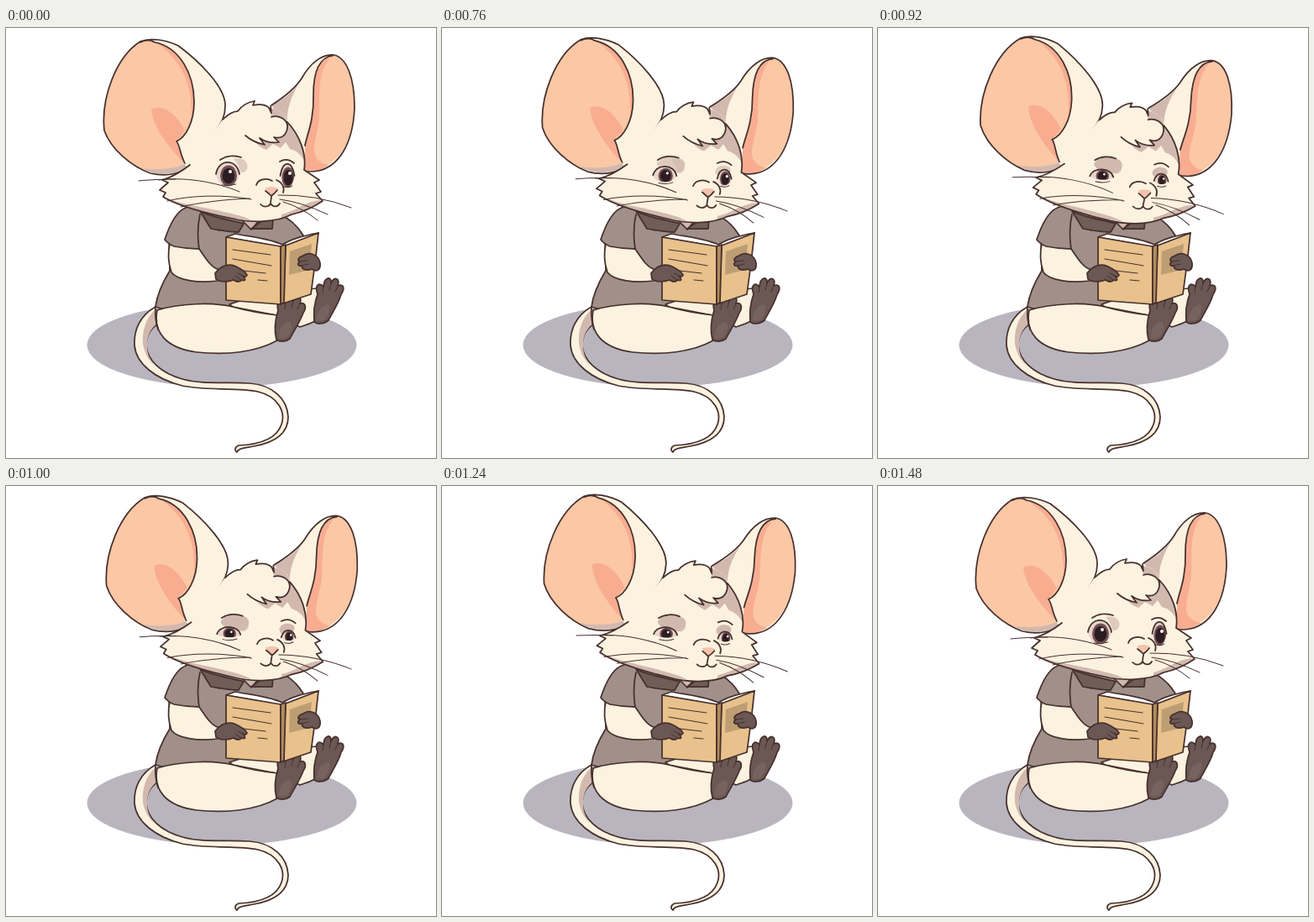
Animation of 512x512 px, one loop 2 s. Source, as an HTML page:

```html
<!DOCTYPE html>
<html lang="en">
<head>
<meta charset="utf-8">
<title>Reading mouse</title>
<style>
html, body { margin: 0; width: 100%; height: 100%; overflow: hidden; background: #fff; }
svg { display: block; width: 100vw; height: 100vh; }
path { fill: none; stroke-linejoin: round; stroke-linecap: round; }
.ink { stroke: #46302d; stroke-width: 1.75; }
.thin { stroke: #46302d; stroke-width: 1; }
.fur { fill: #fbf2e0; }
.shade { fill: #d2b9af; }
.ear { fill: #fbc7a4; }
.blush { fill: #f8ad91; }
.nose { fill: #f4c3ad; }
.shirt { fill: #a09089; }
.collar { fill: #705d58; }
.paw { fill: #6b5855; }
.pad { fill: #76635f; }
.book { fill: #e8c18c; }
.spine { fill: #b18c5c; }
.print { fill: #bd9e73; }
.page { fill: #fff; }
</style>
</head>
<body>
<svg viewBox="0 0 512 512" xmlns="http://www.w3.org/2000/svg">
  <ellipse cx="257" cy="377.500" rx="160.500" ry="50" fill="#b9b5be"/>

  <!-- tail -->
  <path class="fur ink" d="M178 332C160 342 152 359 153 378C155 400 178 418 210 426C240 432 275 428 300 433C325 439 333 458 328 472C322 490 300 496 277 497C272 499 272 503 275 505C277 500 285 500 295 498C318 494 336 484 336 463C335 442 318 425 290 423C262 421 235 425 210 418C185 411 168 396 167 378C167 366 172 358 181 352"/>
  <path class="shade" d="M178 335C166 346 162 360 163 376C165 388 170 396 177 402C170 394 168 386 168 378C168 366 172 358 180 352Z"/>

  <!-- torso and legs -->
  <path class="shirt ink" d="M214 214C230 205 310 205 326 222C340 228 348 237 354 247L340 300L300 335L222 338C205 340 190 336 178 332C180 316 187 302 195 289L194 250Z"/>
  <path class="fur ink" d="M266 329C285 322 330 312 372 310L372 347Q361 353 350 356L322 342L270 332Z"/>
  <path class="fur ink" d="M180 336C205 328 246 326 270 332C288 337 305 340 323 342L323 372C298 386 262 390 227 386C190 381 175 362 180 336Z"/>
  <path class="ink" d="M178 332Q177 347 181 359"/>
  <path class="paw ink" d="M367 350C366 338 368 325 371 317C367 306 373 302 378 308C379 296 388 295 387 304C391 295 398 298 395 307C402 304 404 310 399 317C396 328 388 340 384 348C378 353 370 353 367 350Z"/>
  <path class="pad" d="M370 348C370 338 376 330 383 329C388 331 385 340 380 347Q375 350 370 348Z"/>
  <path class="thin" d="M378 308L377 315M387 304L385 312M395 307L392 314"/>
  <path class="paw ink" d="M322 371C319 360 321 346 324 336C321 326 329 322 333 328C333 318 343 317 342 325C346 317 353 320 350 328C357 326 358 333 354 339C350 350 342 362 338 370C333 374 326 374 322 371Z"/>
  <path class="pad" d="M325 369C324 360 329 351 337 350C343 352 340 361 335 368Q330 371 325 369Z"/>
  <path class="thin" d="M333 328L332 335M342 325L340 333M350 328L347 335"/>

  <!-- collar, sleeve, arm -->
  <path class="shade ink" d="M278 226L304 226L292 240Z"/>
  <path class="collar ink" d="M231 218C246 226 270 229 283 233L277 243C263 243 252 240 244 239Z"/>
  <path class="collar ink" d="M292 239L306 229L318 227L317 239Z"/>
  <path class="fur ink" d="M195 257C192 270 194 282 197 291C205 301 230 304 252 301L252 287C243 284 237 273 230 263L205 255Z"/>
  <path class="shirt ink" d="M214 214C203 218 195 234 189 252Q194 258 200 260Q215 263 230 263C228 250 228 235 231 222"/>

  <!-- book -->
  <path class="page ink" d="M262 249L273 245C294 249 315 251 329 258C342 250 356 247 372 244L333 263L327 261Z"/>
  <path class="book ink" d="M262 249L327 260L327 329L262 324Z"/>
  <path class="book ink" d="M333 259L372 244L368 280L363 317L330 328Z"/>
  <path class="spine ink" d="M327 260L333 258L331 327L327 329Z"/>
  <path class="print" d="M338 266L364 257L361 288L337 294Z"/>
  <path class="thin" d="M270 264L315 270M270 275L316 283M274 288L309 292M300 300L311 301"/>
  <path class="paw ink" d="M249 292C255 283 266 280 274 284C280 287 286 291 287 294C286 297 283 296 282 295C286 299 285 302 281 300C278 303 274 302 271 300C263 303 253 302 250 299Z"/>
  <path class="thin" d="M282 295L276 292M280 300L273 295"/>
  <path class="paw ink" d="M374 280C372 269 360 266 354 271C348 273 346 277 350 278C346 281 348 284 352 283C353 289 360 289 364 287C370 291 375 288 374 280Z"/>
  <path class="thin" d="M350 278L359 277M352 283L360 281"/>

  <g id="head">
    <!-- right ear -->
    <path class="fur" d="M316 92C330 83 345 71 352 60C362 42 376 31 390 32C406 35 415 60 415 95C413 140 395 165 372 170L350 172Z"/>
    <path class="shade" d="M316 92Q337 82 348 67C340 82 334 95 335 113Z"/>
    <path class="ear" d="M389 33C372 35 366 55 366 80C367 110 358 128 356 140L356 170C385 170 411 150 414 98C415 60 406 35 389 33Z"/>
    <path class="blush" d="M385 36C369 40 366 58 366 80C367 110 358 128 356 140L356 170L372 170L385 163C377 162 366 157 367 143C368 130 372 120 373 106C374 84 370 55 385 36Z"/>
    <path class="ink" d="M316 92C330 83 345 71 352 60C362 42 376 31 390 32C406 35 415 60 415 95C413 140 395 165 372 170Q362 172 355 170M389 33C372 35 366 55 366 80C367 110 358 128 356 140"/>

    <!-- left ear -->
    <path class="fur" d="M219 163C212 172 194 178 172 173C150 165 125 145 117 122C113 85 130 35 160 16C172 11 190 14 205 21C228 38 262 70 261 93C261 105 257 112 250 122L240 165Z"/>
    <path class="ear" d="M212 162C196 169 178 170 166 169C146 161 126 144 117 122C113 85 130 35 160 17C166 14 172 14 177 17C207 23 224 55 224 88C224 112 214 130 203 135Z"/>
    <path class="blush" d="M173 97C182 91 200 97 213 122L203 135L211 159C196 145 175 119 173 97ZM178 17C206 23 224 55 224 88L221 106C222 68 210 38 178 17Z"/>
    <path class="shade" d="M212 162C196 169 178 169 162 167C176 176 201 176 216 166Z"/>
    <path class="ink" d="M219 163C212 172 194 178 172 173C150 165 125 145 117 122C113 85 130 35 160 16C172 11 190 14 205 21C228 38 262 70 261 93C261 105 257 112 250 122M160 17C166 14 172 14 177 17C207 23 224 55 224 88C224 112 214 130 203 135C207 139 207 150 213 161"/>

    <!-- skull -->
    <path class="fur" d="M219 163C210 170 200 177 186 181L193 184L183 193L190 196L187 201C205 212 240 221 270 227C290 232 322 232 340 222C355 219 368 212 377 206L369 197L375 195L367 184L373 181L355 169C358 150 350 128 335 112C335 104 326 96 313 95C309 91 303 90 294 92L296 87C288 88 280 93 276 99C270 99 264 103 258 109L250 120L213 160Z"/>
    <path class="shade" d="M187 201C210 211 235 213 260 219C272 222 284 224 292 229C255 226 210 215 187 201ZM328 222C345 218 353 208 373 205L377 206C360 217 343 223 328 226Z"/>
    <path class="shade" d="M313 95C325 96 334 103 335 112C350 128 357 146 356 160C352 151 346 146 338 144L333 136L327 143L318 138L310 145Q301 142 296 135L320 120Z"/>
    <path class="fur" d="M285 128Q294 136 308 139L302 131Q312 138 325 136L319 130Q330 133 334 123Q338 112 328 107Q322 104 316 106L290 105Z"/>
    <path class="ink" d="M219 163C210 170 200 177 186 181L193 184L183 193L190 196L187 201C205 212 240 221 270 227C290 232 322 232 340 222C355 219 368 212 377 206L369 197L375 195L367 184L373 181L355 169C358 150 350 128 335 112M258 109C264 103 270 99 276 99C280 93 288 88 296 87L294 92C303 90 309 91 313 95L316 101L315 93M285 128Q294 136 308 139L302 131Q312 138 325 136L319 130Q330 133 334 123Q338 112 328 107Q322 104 316 106"/>

    <path id="lidL" class="shade" d="M254 162C257 153 273 151 283 155C291 159 288 168 280 172C270 170 258 171 254 162Z"/>
    <path id="lidR" class="shade" d="M324 168C326 161 337 160 341 164C345 170 337 175 329 175Q324 173 324 168Z"/>
    <path class="shade" opacity=".7" d="M271 156C280 153 290 158 287 168Q283 174 279 171Q277 162 271 156Z"/>
    <g id="eyes"></g>
    <path class="ink" d="M255 157C262 152 272 151 280 154M326 159Q335 154 343 161"/>

    <!-- muzzle -->
    <path class="nose" d="M308 191Q316 187 324 191Q320 196 316 200Q312 197 308 191Z"/>
    <path class="ink" d="M298 187C300 180 310 178 317 182M322 181C329 184 332 190 330 196M309 194Q313 197 316 200Q320 197 323 193M316 201L315 208M303 210C307 214 313 213 315 209C318 214 324 213 326 209"/>
    <path class="thin" d="M158 182Q178 180 202 180M182 181C211 177 250 183 278 195M192 206C220 199 260 198 292 204M208 213C230 208 260 204 290 203M324 199Q370 198 411 214M326 204Q351 207 383 222M330 207Q353 214 371 229"/>
  </g>
</svg>
<script>
const NS = "http://www.w3.org/2000/svg";
const $ = id => document.getElementById(id);

function add(parent, tag, attrs) {
  const el = document.createElementNS(NS, tag);
  for (const key in attrs) el.setAttribute(key, attrs[key]);
  return parent.appendChild(el);
}

function makeEye(id, x, y, half, rx) {
  const root = $("eyes");
  const hole = add(add(root, "clipPath", { id }), "path", {});
  const ball = add(root, "g", { "clip-path": `url(#${id})` });
  add(ball, "rect", { x: x - 20, y: y - 25, width: 40, height: 50, fill: "#ead5cb" });
  return {
    x, y, half, rx, hole,
    iris: add(ball, "ellipse", { cx: x + 1, fill: "#705052" }),
    pupil: add(ball, "ellipse", { cx: x + 1, fill: "#2b1d21" }),
    glint: add(ball, "circle", { cx: x + 3, fill: "#fff" }),
    top: add(root, "path", { class: "ink" }),
    low: add(root, "path", { class: "thin" })
  };
}

const eyes = [makeEye("eyeL", 264, 176, 14, 10), makeEye("eyeR", 335, 178, 8.5, 7.5)];

// k runs from 0 (open) to 1 (closed)
function drawEye(e, k) {
  const a = e.x - e.half, b = e.x + e.half;
  const side = e.y - 2 + 4 * k;
  const top = e.y - 21 + 17 * k;
  const low = e.y + 17 - 21 * k;
  const upper = `M${a} ${side}C${a + 3} ${top} ${b - 3} ${top} ${b} ${side}`;
  e.hole.setAttribute("d", `${upper}C${b - 3} ${low} ${a + 3} ${low} ${a} ${side}Z`);
  e.top.setAttribute("d", upper);
  const rim = e.y + 11 - 8 * k;
  e.low.setAttribute("d", `M${e.x - e.half * .5} ${rim}Q${e.x + 2} ${rim + 2} ${e.x + e.half * .7} ${rim - 1}`);
  e.low.style.opacity = k > .95 ? 0 : 1;
  const cy = e.y - k, rx = e.rx - 4 * k, ry = 12.5 - 9 * k;
  const size = (el, s) => {
    el.setAttribute("cy", cy);
    el.setAttribute("rx", rx * s);
    el.setAttribute("ry", ry * s);
  };
  size(e.iris, 1);
  size(e.pupil, .74);
  e.glint.setAttribute("cy", cy - 5 + 5 * k);
  e.glint.setAttribute("r", 2 - 1.2 * k);
}

// piecewise linear track of [time, value] pairs
function track(keys, t) {
  for (let i = 1; i < keys.length; i++) {
    const [t0, v0] = keys[i - 1], [t1, v1] = keys[i];
    if (t <= t1) return v0 + (v1 - v0) * (t - t0) / (t1 - t0);
  }
  return keys[keys.length - 1][1];
}

const lids = [[0, 0], [640, 0], [680, .04], [820, .57], [1000, .57], [1080, 1],
  [1160, .57], [1280, .57], [1480, 0], [2000, 0]];

function nod(t, start) {
  const u = (t - start) / 400;
  return u > 0 && u < 1 ? Math.sin(Math.PI * u) ** 1.3 : 0;
}

function draw(ms) {
  const t = Math.floor((ms % 2000) / 40) * 40;
  const angle = 2.9 * nod(t, 680) + 2.65 * nod(t, 1080);
  const k = track(lids, t);
  $("head").setAttribute("transform", `rotate(${angle} 250 225)`);
  eyes.forEach(e => drawEye(e, k));
  $("lidL").style.opacity = $("lidR").style.opacity = Math.min(1, k * 2);
}

let begin = null;
function loop(now) {
  if (begin === null) begin = now;
  draw(now - begin);
  requestAnimationFrame(loop);
}
draw(0);
requestAnimationFrame(loop);
</script>
</body>
</html>
```
